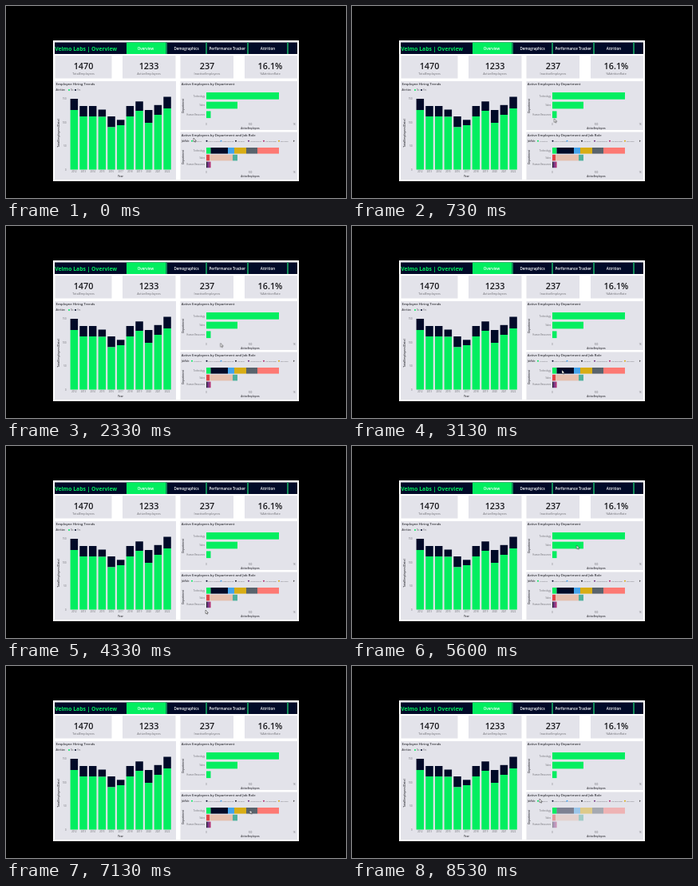
An HTML page that plays this animation: 426x240 px, repeating every 8590 ms.

```html
<!DOCTYPE html>
<html lang="en">
<head>
<meta charset="utf-8">
<title>Dashboard overview</title>
<style>
html, body { margin: 0; width: 100%; height: 100%; overflow: hidden; background: #000; }
svg { display: block; width: 100%; height: 100%; }
text { font-family: "Open Sans", "Noto Sans", sans-serif; fill: #6c6c72; }
.bold { font-weight: 600; fill: #34343a; }
.cursor { animation: move 8.59s ease-in-out infinite; }
.dim { animation: dim 8.59s step-end infinite; }
@keyframes move {
  0% { transform: translate(235px, 165px); }
  17.8% { transform: translate(274.5px, 112.5px); }
  36.4% { transform: translate(263px, 180px); }
  50.4% { transform: translate(250px, 205px); }
  65.2% { transform: translate(281.5px, 124px); }
  83% { transform: translate(305.5px, 180px); }
  97%, 100% { transform: translate(235px, 166px); }
}
@keyframes dim {
  0% { opacity: 1; }
  97% { opacity: .45; }
  100% { opacity: .45; }
}
</style>
</head>
<body>
<svg id="stage" viewBox="0 0 426 240" preserveAspectRatio="none"></svg>
<script>
const NS = "http://www.w3.org/2000/svg";
const stage = document.getElementById("stage");
const GREEN = "#03ee60", NAVY = "#010a28", CARD = "#e3e3ea";

function add(tag, attrs, parent = stage) {
  const node = document.createElementNS(NS, tag);
  for (const key in attrs) node.setAttribute(key, attrs[key]);
  return parent.appendChild(node);
}

// Boxes are given by their edges.
function box(x1, y1, x2, y2, fill, parent) {
  return add("rect", { x: x1, y: y1, width: x2 - x1, height: y2 - y1, fill }, parent);
}

function label(str, x, y, size, extra = {}) {
  const node = add("text", { x, y, "font-size": size, ...extra });
  node.textContent = str;
  return node;
}

const mid = { "text-anchor": "middle" };
const end = { "text-anchor": "end" };
const bold = { class: "bold" };

function sideLabel(str, x, y, size) {
  label(str, x, y, size, { ...mid, ...bold, transform: `rotate(-90 ${x} ${y})` });
}

function dot(x, y, fill, parent) {
  add("circle", { cx: x, cy: y, r: 1, fill }, parent);
}

function header() {
  box(61, 45.5, 365, 60, NAVY);
  label("Velmo Labs | Overview", 61.2, 56, 6.8, { style: `fill:${GREEN};font-weight:700` });
  box(151, 45.5, 200, 60, GREEN);
  [200, 250, 302, 352].forEach(x => box(x, 45.5, x + 2, 60, "#128a58"));
  [["Overview", 175], ["Demographics", 226], ["Performance Tracker", 277.3], ["Attrition", 328]]
    .forEach(([str, x]) => label(str, x, 54.8, 4.5, { ...mid, style: "fill:#fff;font-weight:600" }));
}

function cards() {
  [
    [61.5, 132.5, 97, "1470", "TotalEmployees"],
    [146, 212.5, 179, "1233", "ActiveEmployees"],
    [218.5, 285, 252, "237", "InactiveEmployees"],
    [299, 365, 331, "16.1%", "%AttritionRate"]
  ].forEach(([x1, x2, cx, value, name]) => {
    box(x1, 62, x2, 90.5, CARD);
    label(value, cx, 79, 10.8, { ...mid, style: "fill:#18181c;font-weight:600" });
    label(name, cx, 85.8, 3.8, mid);
  });
}

function hiring() {
  box(61, 94, 213, 217, CARD);
  label("Employee Hiring Trends", 62.5, 99.4, 4.3, bold);
  label("Attrition", 62.5, 106, 2.8, bold);
  dot(79, 105, GREEN);
  label("No", 81, 106, 2.8);
  dot(87, 105, NAVY);
  label("Yes", 89, 106, 2.8);
  for (let i = 0; i < 4; i++) label(i * 50, 75.5, 205.5 - i * 29.4, 2.8, end);
  const tops = [116, 125, 125, 129.5, 138, 142.3, 125, 119.3, 130, 123.8, 113.5];
  const splits = [130, 138, 138, 138.5, 151.5, 149, 138, 131, 146, 136, 128];
  tops.forEach((top, i) => {
    const x = 80.6 + i * 11.67;
    box(x, top, x + 9.5, splits[i], NAVY);
    box(x, splits[i], x + 9.5, 204.5, GREEN);
    label(2012 + i, x + 4.75, 208.4, 2.8, mid);
  });
  label("Year", 143.5, 214, 3.2, { ...mid, ...bold });
  sideLabel("TotalEmployees(Date)", 67, 159, 3.4);
}

function rowAxes(rows, axisY, titleY, sideY) {
  ["Technology", "Sales", "Human Resources"].forEach((str, i) => label(str, 249, rows[i], 2.7, end));
  ["0", "500", "1K"].forEach((str, i) => label(str, 251 + i * 55, axisY, 2.7, mid));
  label("ActiveEmployees", 306, titleY, 2.9, { ...mid, ...bold });
  sideLabel("Department", 222.6, sideY, 3);
}

function departments() {
  box(218.5, 94, 365, 155, CARD);
  label("Active Employees by Department", 219.7, 99.4, 4.2, bold);
  rowAxes([113.5, 125.2, 136.7], 149, 153.6, 125);
  [342, 290, 256.5].forEach((x, i) => box(251, 108 + i * 11.7, x, 116.7 + i * 11.7, GREEN));
}

function roles() {
  box(218.5, 157.5, 365, 217, CARD);
  label("Active Employees by Department and Job Role", 219.7, 162.6, 4.2, bold);
  label("JobRole", 220, 169.8, 2.6, bold);
  [
    ["Analytics", 233, GREEN], ["Data Scientist", 251.5, NAVY], ["Engineering", 269.5, "#40a0ee"],
    ["HR Exec", 288, "#20202a"], ["HR Business", 304, "#713181"], ["HR Manager", 323, "#b02a70"],
    ["Machine", 342, "#d8ad16"]
  ].forEach(([str, x, fill]) => {
    dot(x, 168.8, fill);
    label(str, x + 1.8, 169.8, 2.5);
  });
  add("path", { d: "M360 167.6l1.8 1.2l-1.8 1.2z", fill: "#555" });
  rowAxes([181.8, 190.5, 199.3], 209.3, 213.8, 189);

  box(251, 177, 256.5, 184.6, GREEN);
  const rest = add("g", { class: "dim" });
  const rows = [
    [177, 256.5, [278, NAVY], [286, "#42a3eb"], [301, "#d8ad16"], [315, "#59636c"], [342, "#fd7973"]],
    [185.8, 251, [255, "#df4545"], [284, "#e5bfae"], [290, "#4eb29f"]],
    [194.6, 251, [252, "#20202a"], [254.8, "#713181"], [256.5, "#b02a70"]]
  ];
  rows.forEach(([y, start, ...parts]) => {
    let x = start;
    parts.forEach(([next, fill]) => {
      box(x, y, next, y + 7.6, fill, rest);
      x = next;
    });
  });
}

box(59, 43, 367, 219, "#fff");
header();
cards();
hiring();
departments();
roles();
add("path", {
  class: "cursor",
  d: "M0 0V4.6L1.1 3.7L1.9 5.3L2.7 4.9L2 3.4H3.4Z",
  fill: "#fff", stroke: "#222", "stroke-width": .5
});
</script>
</body>
</html>
```
